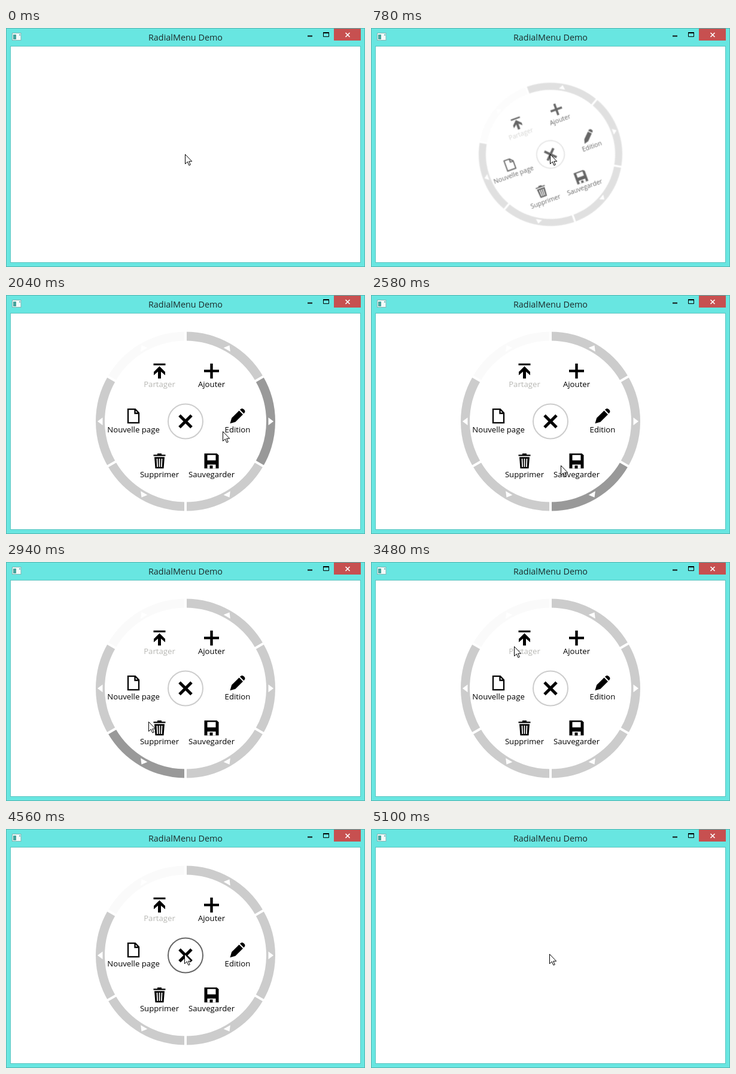
Animation, 600 px wide and 400 px high, one loop 5600 ms. Source, as an HTML page:

```html
<!DOCTYPE html>
<html lang="fr">
<head>
<meta charset="utf-8">
<title>RadialMenu Demo</title>
<style>
  html, body { margin: 0; height: 100%; overflow: hidden; }
  svg { display: block; width: 600px; height: 400px; }
  text { font-family: "Open Sans", "Noto Sans", sans-serif; text-anchor: middle; }
  .title { font-size: 14.4px; fill: #1c2b2b; }
  .label { font-size: 13.2px; }
  .line { fill: none; stroke: #000; }
  .white { fill: #fff; }
</style>
</head>
<body>
<svg viewBox="0 0 600 400">
  <!-- window -->
  <rect x=".5" y=".5" width="599" height="399" fill="#68e6e1" stroke="#51b4b0"/>
  <rect x="7.5" y="30.5" width="585" height="362" fill="#fff" stroke="#5cc4c0"/>
  <rect x="10.5" y="8.5" width="14.5" height="12" fill="#f3faf9" stroke="#7fb5b3"/>
  <rect x="12" y="11" width="5" height="8" fill="#45a39c"/>
  <rect x="22" y="10" width="2" height="3" fill="#8cc"/>
  <text class="title" x="300" y="21">RadialMenu Demo</text>
  <path d="M504 13.5h8" stroke="#111" stroke-width="2"/>
  <path d="M530.5 8v6.5h9V8" class="line"/>
  <path d="M530 8h10" class="line" stroke-width="2"/>
  <rect x="548" y="1" width="45" height="20" fill="#c75050"/>
  <path d="M567.5 8l7 7m0-7l-7 7" stroke="#fff" stroke-width="1.7"/>

  <g id="menu">
    <g id="ring"></g>
    <circle id="hub" r="29" fill="#fff" stroke-width="2"/>
    <path d="M-10-10L10 10M10-10L-10 10" class="line" stroke-width="5"/>
    <g id="items"></g>
  </g>
  <path id="cursor" d="M.5.5v16l3.8-3.6 2.6 6 2.4-1-2.6-5.7h5z" fill="#fff" stroke="#000"/>
</svg>
<script>
const $ = id => document.getElementById(id);
const CX = 300, CY = 211.5, DISABLED = 5;

// Clockwise from the top; icons are centred on 0,0
const items = [
  ['Ajouter', '<path d="M0-12.5v25M-12.5 0h25" class="line" stroke-width="4.4"/>'],
  ['Edition', '<path d="M-12.5 12.5l2.6-9L-9 2.6 2.6-9 9-2.6-2.6 9l-1 1zM4-10.4L5.4-11.7Q8-13.5 11-10.8Q13.6-8 11.7-5.4L10.4-4z"/>'],
  ['Sauvegarder', '<path d="M-12-12.5h21l3 3v22h-24z"/><path class="white" d="M-7-10H7V-1H-7zM-7 6H7v6.5H-7z"/><path d="M-3 7.5h5v5h-5z"/>'],
  ['Supprimer', '<path d="M-10-9.5h20M-3.5-11.4h7" class="line" stroke-width="2.2"/><path d="M-8.5-6.5h17l-1.5 19H-7z"/><path d="M-4-4l.6 14M0-4v14M4-4l-.6 14" stroke="#fff" stroke-width="1.8"/>'],
  ['Nouvelle page', '<path d="M-9-11.3H3L9-5v16.3H-9zM2.5-11v6.5H9" class="line" stroke-width="2.3"/>'],
  ['Partager', '<path d="M-10-12.5h20v3h-20z"/><path d="M0-8L9.5 1.5V7L2.5 1V12.5h-5V1L-9.5 7V1.5z"/>']
];

const polar = (r, deg) => {
  const a = deg * Math.PI / 180;
  return [r * Math.sin(a), -r * Math.cos(a)];
};

items.forEach(([name, icon], i) => {
  const mid = 30 + 60 * i, [x, y] = polar(87, mid);
  $('ring').innerHTML += `<path class="sector" fill="none" stroke-width="15"
    d="M${polar(142.5, mid - 30)}A142.5 142.5 0 0 1 ${polar(142.5, mid + 30)}"/>
    <path class="white" d="M0-147l6.5 8.5h-13z" transform="rotate(${mid})"/>`;
  $('items').innerHTML += `<g transform="translate(${x} ${y})">
    <g transform="translate(0 -9)">${icon}</g>
    <text class="label" y="18.3" fill="${i == DISABLED ? '#b8b8b4' : '#000'}">${name}</text></g>`;
});
for (let a = 0; a < 360; a += 60)
  $('ring').innerHTML += `<path d="M0-133v-20" stroke="#fff" stroke-width="4" transform="rotate(${a})"/>`;
const sectors = document.querySelectorAll('.sector');

// Pointer path: time, radius, clockwise angle
const path = [[0, 0, 10], [780, 0, 10], [1320, 51.5, 24.1], [2580, 76.2, 166.3],
  [3480, 92.2, 319.4], [3660, 90, 321], [4560, 2.2, 333], [5600, 2.2, 333]];

function pointer(t) {
  const i = path.findIndex(k => k[0] > t), a = path[i - 1], b = path[i];
  const u = (t - a[0]) / (b[0] - a[0]);
  return [1, 2].map(j => a[j] + (b[j] - a[j]) * u);
}

function draw(now) {
  const t = now % 5600;
  const s = t < 600 ? 0 : Math.min(5100, 600 + 180 * Math.floor((t - 600) / 180));
  const open = Math.max(0, Math.min(1, (s - 600) / 300, (4972 - s) / 300));
  const [r, angle] = pointer(s), [x, y] = polar(r, angle);
  const hover = r > 30 ? Math.floor(angle / 60) : -1;

  $('cursor').setAttribute('transform', `translate(${Math.round(299 + x)} ${Math.round(211 + y)})`);
  $('menu').setAttribute('opacity', open);
  $('menu').setAttribute('transform',
    `translate(${CX} ${CY}) rotate(${-50 * (1 - open)}) scale(${0.5 + open / 2})`);
  $('hub').setAttribute('stroke', r < 30 && s > 900 ? '#666' : '#ccc');
  sectors.forEach((el, i) => el.setAttribute('stroke',
    i == DISABLED ? '#fafafa' : i == hover ? '#999' : '#ccc'));
  requestAnimationFrame(draw);
}
requestAnimationFrame(draw);
</script>
</body>
</html>
```
